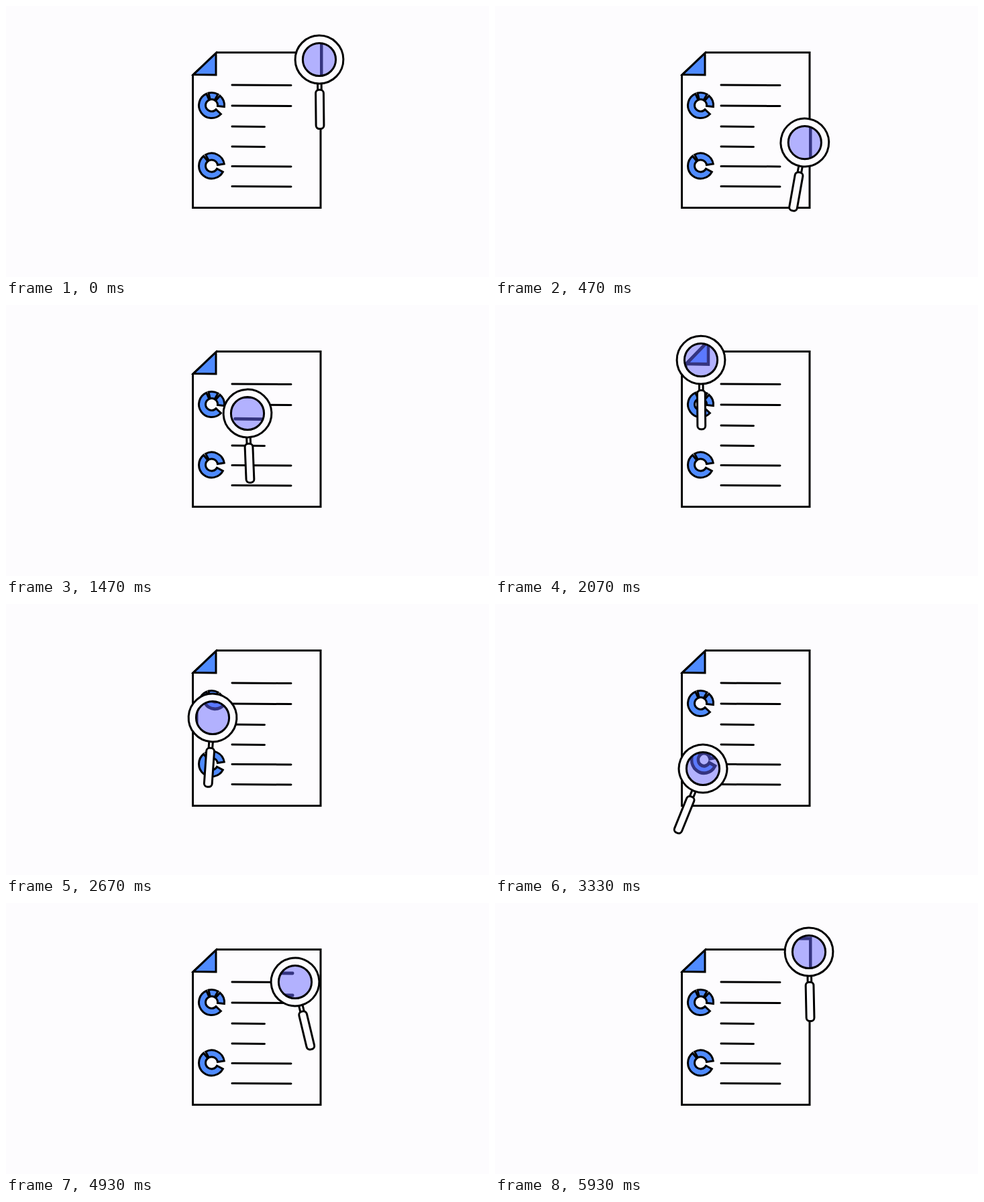
Animation, 720 px wide and 405 px high, one loop 5.99 s. Source, as an HTML page:

```html
<!DOCTYPE html>
<html lang="en">
<head>
<meta charset="utf-8">
<title>Document search</title>
<style>
  html, body { margin: 0; width: 100%; height: 100%; overflow: hidden; background: #fdfcfe; }
  svg { display: block; width: 100%; height: 100%; }
  .ink { stroke: #000; stroke-width: 3; }
  #magnified .ink { stroke-width: 4.6; }
  .paper { fill: #fdfcfe; }
  .blue { fill: #4f8bff; }
  .round { stroke-linecap: round; }
</style>
</head>
<body>
<svg viewBox="0 0 720 405">
  <defs>
    <clipPath id="lensClip"><circle id="lensHole" r="24.6"/></clipPath>
  </defs>
  <g id="page"></g>
  <g id="glass">
    <path class="ink paper" d="M-2.8 35V46H2.8V35"/>
    <rect class="ink paper" x="-5.9" y="45.3" width="11.8" height="58.2" rx="5"/>
    <circle class="ink paper" r="35.9"/>
  </g>
  <g clip-path="url(#lensClip)">
    <g id="magnified" transform="matrix(.976 0 0 1.06 12.5 -20.7)"></g>
  </g>
  <circle id="lens" class="ink" r="24.6" fill="rgb(104,104,255)" fill-opacity=".5"/>
</svg>
<script>
const LOOP = 5990, STEP = 66.6, FRAMES = 90;
const el = id => document.getElementById(id);

// Ring sector between two angles in degrees, clockwise from the right.
function sector(cx, cy, from, to, inner = 9, outer = 19) {
  const at = (r, deg) => {
    const a = deg * Math.PI / 180;
    return `${(cx + r * Math.cos(a)).toFixed(2)} ${(cy + r * Math.sin(a)).toFixed(2)}`;
  };
  const large = to - from > 180 ? 1 : 0;
  return `<path class="ink blue" d="M${at(outer, from)}A${outer} ${outer} 0 ${large} 1 ${at(outer, to)}` +
    `L${at(inner, to)}A${inner} ${inner} 0 ${large} 0 ${at(inner, from)}Z"/>`;
}

const textLine = (y, right) =>
  `<path class="ink round" d="M337 ${y}L${right} ${y + 0.6}"/>`;

function pageMarkup() {
  return [
    '<path class="ink paper" d="M278.5 103L314 69.5H469V301.5H278.5Z"/>',
    '<path class="ink blue" d="M313 70.5V103L279.5 102.5Z"/>',
    textLine(118, 425), textLine(149, 425),
    textLine(180, 385.5), textLine(210, 385.5),
    textLine(239.4, 425), textLine(269.5, 425),
    sector(306.5, 148.5, 43, 246),
    sector(306.5, 148.5, 256, 300),
    sector(306.5, 148.5, 311, 366),
    sector(306.5, 239, 28, 231),
    sector(306.5, 239, 242, 351)
  ].join('');
}

// Glass poses: [frame, x, y, tilt]
const poses = [
  [0, 467, 80, -0.6], [9, 460, 238, 14], [13, 454, 287, 24], [15, 448, 288, 25.3],
  [18, 422, 250, 18], [22, 360, 162, -2.3], [27, 308, 81, -3], [30, 307, 80, -1],
  [36, 307, 127, 2], [40, 308, 170, 3.9], [45, 311, 217, 12], [50, 310, 246, 22],
  [54, 317, 239, 14], [60, 366, 193, -19.1], [63, 383, 179, -26], [72, 418, 128, -15],
  [74, 431, 118, -13.4], [81, 472, 69, -4], [83, 473, 67, -3], [89, 468, 73, -1.2]
];

// Cyclic access to a pose, with its frame unwrapped.
function pose(i) {
  const n = poses.length, turn = Math.floor(i / n);
  const [frame, ...rest] = poses[i - turn * n];
  return [frame + turn * FRAMES, ...rest];
}

// Shape-preserving slope: flat at turning points, harmonic mean elsewhere.
function slope(i, c) {
  const a = pose(i - 1), b = pose(i), d = pose(i + 1);
  const before = (b[c] - a[c]) / (b[0] - a[0]);
  const after = (d[c] - b[c]) / (d[0] - b[0]);
  return before * after <= 0 ? 0 : 2 * before * after / (before + after);
}

function sample(frame, c) {
  let i = poses.length - 1;
  while (poses[i][0] > frame) i--;
  const a = pose(i), b = pose(i + 1), span = b[0] - a[0];
  const u = (frame - a[0]) / span, v = 1 - u;
  return a[c] * v * v * (1 + 2 * u) + b[c] * u * u * (3 - 2 * u) +
    span * u * v * (slope(i, c) * v - slope(i + 1, c) * u);
}

function draw(ms) {
  const frame = Math.min(FRAMES - 1, Math.floor((ms % LOOP + 4) / STEP));
  const [x, y, tilt] = [1, 2, 3].map(c => sample(frame, c));
  el('glass').setAttribute('transform', `translate(${x} ${y}) rotate(${tilt})`);
  for (const id of ['lens', 'lensHole']) {
    el(id).setAttribute('cx', x);
    el(id).setAttribute('cy', y);
  }
}

el('page').innerHTML = el('magnified').innerHTML = pageMarkup();
const start = performance.now();
function tick() {
  draw(performance.now() - start);
  requestAnimationFrame(tick);
}
tick();
</script>
</body>
</html>
```
